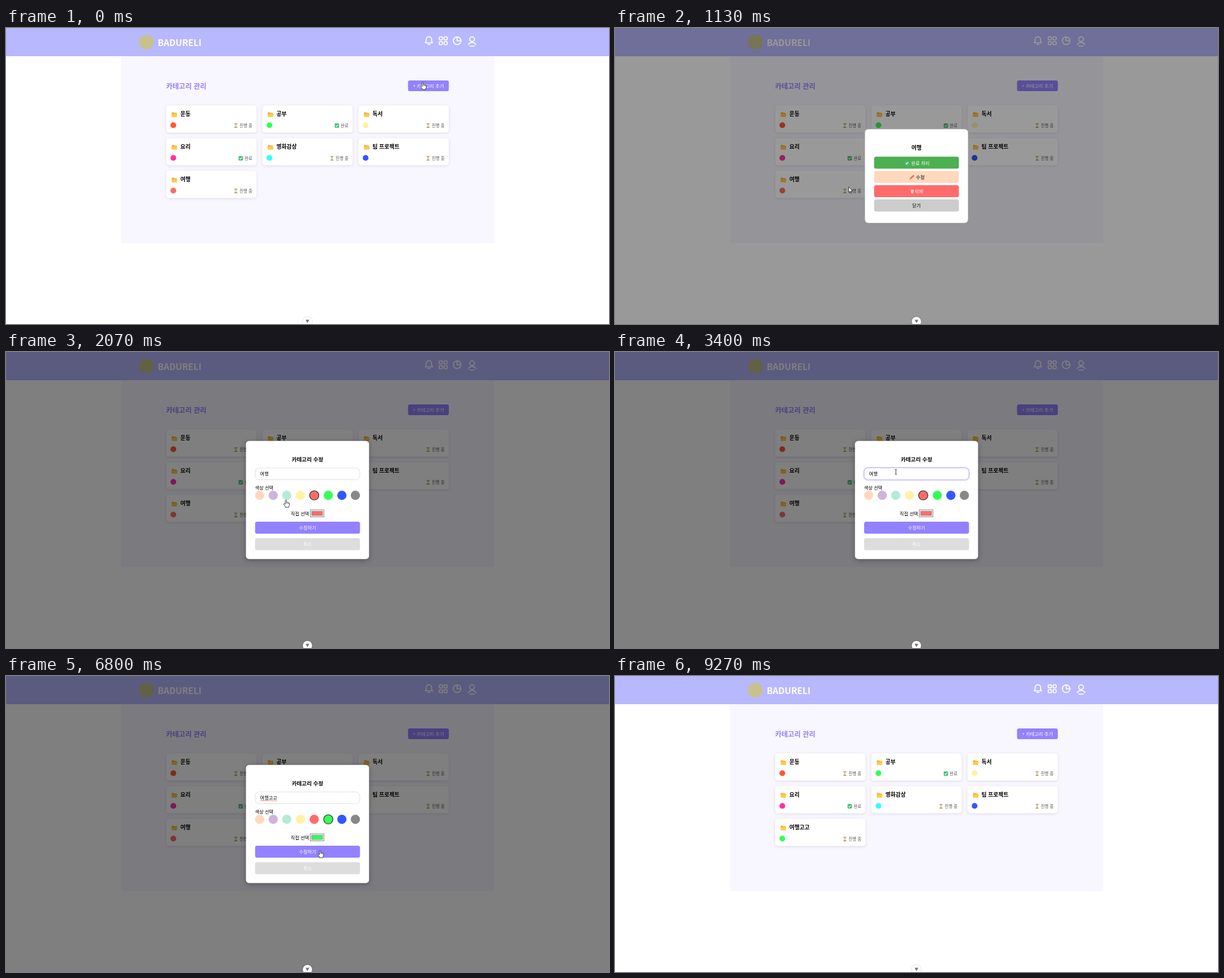
Write an HTML page that moves like this. It is 1067 by 525 pixels and loops after 9870 ms.

```html
<!DOCTYPE html>
<html lang="ko">
<head>
<meta charset="utf-8">
<title>카테고리 관리</title>
<style>
  html, body { margin: 0; width: 100%; height: 100%; overflow: hidden; background: #fff; }
  svg { display: block; position: absolute; left: 0; top: 0; }
  text { font-family: "Noto Sans CJK KR", "Noto Sans KR", "Noto Sans CJK", "Noto Sans CJK JP", sans-serif; white-space: pre; }
  .card { filter: drop-shadow(0 1.5px 2px rgba(0,0,0,.12)); }
  .lift { filter: drop-shadow(0 2px 5px rgba(0,0,0,.3)); }
  .down { filter: drop-shadow(0 .5px 1.5px rgba(0,0,0,.2)); }
</style>
</head>
<body>
<svg id="stage" width="1067" height="525" viewBox="0 0 1067 525"></svg>
<script>
const LOOP = 9870, FRAME = 200 / 3;
const VIOLET = '#9381ff', CORAL = '#ff6b6b', LIME = '#33ff57';

const rect = (x, y, w, h, fill, r = 0, more = '') =>
  `<rect x="${x}" y="${y}" width="${w}" height="${h}" rx="${r}" fill="${fill}" ${more}/>`;
const disc = (x, y, r, fill, more = '') => `<circle cx="${x}" cy="${y}" r="${r}" fill="${fill}" ${more}/>`;
const path = (d, more) => `<path d="${d}" ${more}/>`;
const label = (x, y, s, size, fill = '#000', more = '') =>
  `<text x="${x}" y="${y}" font-size="${size}" fill="${fill}" ${more}>${s}</text>`;
const at = (x, y, inner) => `<g transform="translate(${x} ${y})">${inner}</g>`;
const BOLD = 'font-weight="700"', MID = 'text-anchor="middle"', END = 'text-anchor="end"';

// Small icons, drawn around their own origin
const folder = path('M-4.6 3.6V-3.4q0-.8.8-.8h2.4l1.1 1.2h3.5q.8 0 .8.8v1', 'fill="#f5a623"')
  + path('M-4.6 4.2V-.6L-3 -1.8H4.9q.5 0 .4.6L4.4 3.6q-.2.7-.9.7z', 'fill="#ffca4d"');
const check = rect(-3.8, -3.8, 7.6, 7.6, '#43bf75', 1.2)
  + path('M-2.1 0L-.6 1.7L2.2 -1.8', 'fill="none" stroke="#fff" stroke-width="1.1"');
const glass = path('M-2.2 -3.2H2.2Q2.2 -1 .5 0Q2.2 1 2.2 3.2H-2.2Q-2.2 1 -.5 0Q-2.2 -1 -2.2 -3.2z', 'fill="#cddccf"')
  + path('M-1.5 -1.8H1.5L0 .2zM-1.9 3L0 1.2L1.9 3z', 'fill="#e6b04a"')
  + rect(-2.9, -3.9, 5.8, 1, '#a68352', .4) + rect(-2.9, 2.9, 5.8, 1, '#a68352', .4);
const pencil = path('M-4.2 4L-3.2 1.2L2 -3.8L4 -1.8L-1.4 3.1z', 'fill="#ee6a3c"')
  + path('M-4.2 4L-3.2 1.2L-1.4 3.1z', 'fill="#f3cf9c"')
  + path('M2 -3.8L2.9 -4.4L4.5 -2.7L4 -1.8z', 'fill="#d94f5c"');
const bin = path('M-2.2 -1.8H2.2L1.8 3.2H-1.8zM-2.6 -3H2.6V-2.2H-2.6z', 'fill="#fff"')
  + path('M-.6 -1V2.4M.7 -1V2.4', 'stroke="#ff6b6b" stroke-width=".6"');

const cursors = {
  arrow: path('M0 0V9.8L2.3 7.7L3.8 11.2L5.3 10.5L3.8 7.2H6.8z', 'fill="#fff" stroke="#111" stroke-width=".8"'),
  hand: path('M-1.1 .9Q0 -.7 1.1 .9V4.4Q2.2 3.8 3 4.8Q4 4.3 4.7 5.4Q6 5 6.2 6.5V9Q6.2 10.6 5 12V13.2H-.8V12.2L-3.8 8.2Q-4.4 6.8 -3 6.6L-1.1 8z',
    'fill="#fff" stroke="#111" stroke-width=".8" stroke-linejoin="round"') + path('M1.1 4.4V7M3 5V7.2M4.7 5.6V7.4', 'stroke="#111" stroke-width=".5"'),
  beam: path('M-1.8 -4.4Q0 -4.4 0 -3.6Q0 -4.4 1.8 -4.4M0 -3.6V3.6M-1.8 4.4Q0 4.4 0 3.6Q0 4.4 1.8 4.4', 'fill="none" stroke="#222" stroke-width=".9"')
};

const cards = [
  ['운동', '#ff5733'], ['공부', LIME, 1], ['독서', '#fff1a6'],
  ['요리', '#ff33a1', 1], ['영화감상', '#33fff6'], ['팀 프로젝트', '#3357ff'],
  ['여행', CORAL]
];

function card([name, color, done], i) {
  const last = i === 6;
  return at(283.4 + i % 3 * 170.1, 137.2 + Math.floor(i / 3) * 58,
    rect(0, 0, 160, 48.4, '#fff', 5, 'class="card"')
    + at(14.6, 16.4, folder)
    + label(25, 19.1, name, 9.78, '#000', BOLD + (last ? ' id="name"' : ''))
    + disc(12.7, 35.2, 5.1, color, last ? 'id="dot"' : '')
    + at(done ? 132 : 123.3, 35.9, done ? check : glass)
    + label(152.6, 38.6, done ? '완료' : '진행 중', 7.5, '#555', END));
}

const header = rect(0, 0, 1067, 50, '#b8b8ff')
  + disc(248.3, 25, 13, '#c5c28c')
  + label(268.4, 32, 'BADURELI', 15.56, '#fff', BOLD)
  + `<g fill="none" stroke="#fff" stroke-width="1.8" stroke-linecap="round" stroke-linejoin="round">`
  + path('M741.9 26.3H754.7L753.2 23.6V20.4A4.9 4.9 0 0 0 743.4 20.4V23.6zM746.6 29.2H750')
  + [0, 1, 2, 3].map(i => rect(766.6 + i % 2 * 8.5, 15.6 + (i >> 1) * 8.5, 5.6, 5.6, 'none', 1.6)).join('')
  + disc(798.3, 22.6, 6.8, 'none') + path('M798.3 15.8V22.6H805.1')
  + disc(824.7, 19.8, 4.2, 'none') + path('M817.8 29.6Q820.2 25.6 824.7 25.6T831.6 29.6M820.8 31.7Q824.7 32.9 828.6 31.7')
  + '</g>';

const page = rect(203.6, 50, 660.2, 331.6, '#f8f7ff') + header
  + label(283.2, 107.6, '카테고리 관리', 12.3, VIOLET, BOLD)
  + rect(711.4, 92.9, 72.2, 19.2, VIOLET, 3.4)
  + label(747.5, 105.9, '+ 카테고리 추가', 8.3, '#fff', MID)
  + cards.map(card).join('')
  + rect(434.2, 283.4, .9, 10.4, '#000', 0, 'id="stray"');

const bar = (y, fill) => rect(458.5, y, 150, 21.3, fill, 3.6);
const menu = rect(0, 0, 1067, 525, 'rgba(0,0,0,.4)')
  + rect(442.3, 179.6, 182.3, 166.1, '#fff', 5.6)
  + label(533.5, 216, '여행', 9.78, '#000', MID + BOLD.replace('font', ' font'))
  + bar(228.3, '#4caf50') + at(516.8, 239.6, check) + label(524.2, 242.6, '완료 처리', 8.2, '#fff')
  + bar(253.5, '#ffd8be') + at(525, 265, pencil) + label(532.6, 267.9, '수정', 8.2)
  + bar(278.8, CORAL) + at(526, 290, bin) + label(530.3, 293.1, '삭제', 8.2, '#fff')
  + bar(304.1, '#ccc') + label(533.5, 318.3, '닫기', 8.2, '#000', MID);

const swatches = [[448.8, '#ffd8be'], [472.8, '#cdb4db'], [496.7, '#b5ead7'], [521, '#fff1a6'],
  [545.4, CORAL], [570.3, LIME], [594.3, '#3357ff'], [618.2, '#888']];
const TEXT_X = 449.6, TEXT_SIZE = 8.2, STEP = TEXT_SIZE * .92;
let wave = `M${TEXT_X + .4} 221`;
for (let i = 0; i < 15; i++) wave += `q.5 -1.1 1 0t1 0`;

const edit = rect(0, 0, 1067, 525, 'rgba(0,0,0,.5)')
  + rect(424.6, 157.8, 217.8, 209.4, '#fff', 5.6, 'class="lift"')
  + label(533.5, 193.8, '카테고리 수정', 9.6, '#000', MID + ' ' + BOLD)
  + rect(440.2, 204.9, 186.6, 22.4, 'none', 7.5, 'id="ring" stroke="#dad4ff" stroke-width="2"')
  + rect(441, 205.7, 185, 20.8, '#fff', 6.7, 'id="field" stroke-width=".6"')
  + label(TEXT_X, 219.3, '', TEXT_SIZE, '#000', 'id="typed"')
  + path(wave, 'id="wave" fill="none" stroke="#e8322c" stroke-width=".7"')
  + rect(0, 212, .9, 9, '#000', 0, 'id="caret"')
  + label(440.7, 243.7, '색상 선택', 8.2)
  + swatches.map(([x, c]) => disc(x, 254.3, 8.2, c, 'class="sw" stroke="#333"')).join('')
  + label(503.8, 290, '직접 선택', 8.2)
  + rect(538.3, 279.9, 24.4, 12.7, '#efefef', 0, 'stroke="#767676" stroke-width=".8"')
  + rect(540.9, 282.5, 19.2, 7.5, CORAL, 0, 'id="pick" stroke="#777" stroke-width=".6"')
  + rect(440.8, 301.1, 185.6, 21.2, VIOLET, 3.6) + label(533.5, 315.2, '수정하기', 8.2, '#fff', MID)
  + rect(440.8, 330.3, 185.6, 21.3, '#ddd', 3.6) + label(533.5, 344.4, '취소', 8.2, '#fff', MID);

const $ = id => document.getElementById(id);
$('stage').innerHTML = `<g>${page}</g><g id="menu">${menu}</g><g id="edit">${edit}</g>`
  + disc(533.4, 520.6, 8.2, '#fff', 'class="down"') + path('M530.1 517.6H536.7L533.4 523.4z', 'fill="#777"')
  + '<g id="mouse">' + Object.keys(cursors).map(k => `<g id="${k}">${cursors[k]}</g>`).join('') + '</g>';
const dots = [...document.querySelectorAll('.sw')];

// Pointer track: time, x, y
const track = [
  [0, 737.4, 96], [70, 729, 101], [130, 700, 116], [200, 634, 155], [270, 545, 215], [330, 468, 264],
  [400, 428, 289], [470, 415, 293.5], [530, 413.6, 281.8], [1400, 413.6, 281.8], [1530, 440, 276], [1670, 488, 264],
  [1730, 495.3, 262.2], [2130, 495.3, 262.2], [2400, 495, 240], [2600, 496.5, 217], [2730, 497, 212.8], [5330, 497, 212.8],
  [5470, 506, 219], [5670, 547, 244], [5870, 571.5, 258.6], [6130, 572, 261.4], [6270, 572, 261.4],
  [6400, 567, 282], [6600, 556, 307], [6670, 555.7, 309], [7000, 555.7, 309], [7200, 537, 330], [7400, 526, 340],
  [8400, 526, 340], [8600, 460, 365], [8800, 300, 424], [9000, 125, 493], [9070, 51, 516], [9130, 20, 540], [LOOP, 20, 540]
];
// Typed value over time
const typing = [[0, '여행'], [4130, '여행ㄱ'], [4270, '여행고'], [4400, '여행고ㄱ'], [4530, '여행고고']];

function pointer(t) {
  const i = Math.max(1, track.findIndex(p => p[0] >= t));
  const [t0, x0, y0] = track[i - 1], [t1, x1, y1] = track[i], k = (t - t0) / (t1 - t0);
  return [x0 + (x1 - x0) * k, y0 + (y1 - y0) * k];
}

function cursorKind(x, y, view) {
  const over = (l, t, r, b) => x >= l && x <= r && y >= t && y <= b;
  if (view === 'menu')
    return [0, 1, 2, 3].some(i => over(458, 228.3 + i * 25.2, 609, 249.6 + i * 25.2)) ? 'hand' : 'arrow';
  if (view === 'edit') {
    if (over(440, 204, 627, 228)) return 'beam';
    const hit = swatches.some(([sx]) => Math.hypot(x - sx, y - 254.3) < 8.6);
    return hit || over(441, 301, 627, 322) || over(441, 330, 627, 352) ? 'hand' : 'arrow';
  }
  return over(711, 93, 784, 112) ? 'hand' : 'arrow';
}

const show = (id, on) => $(id).setAttribute('visibility', on ? 'visible' : 'hidden');
const set = (el, name, v) => el.setAttribute(name, v);
const within = (t, ...spans) => spans.some(([a, b]) => t >= a && t < b);

function draw(ms) {
  const t = Math.min(LOOP - 10, Math.round(Math.floor((ms % LOOP + 3.5) / FRAME) * FRAME / 10) * 10);
  const view = within(t, [1130, 2070]) ? 'menu' : within(t, [2070, 6870]) ? 'edit' : 'page';
  const saved = t >= 6870, picked = t >= 6270, focused = within(t, [2870, 6270]);

  $('menu').style.display = view === 'menu' ? '' : 'none';
  $('edit').style.display = view === 'edit' ? '' : 'none';
  $('name').textContent = saved ? '여행고고' : '여행';
  set($('dot'), 'fill', saved ? LIME : CORAL);
  show('stray', within(t, [6870, 7400], [7930, 8470], [9000, 9270]));

  if (view === 'edit') {
    const value = typing.filter(s => t >= s[0]).pop()[1];
    $('typed').textContent = value;
    set($('caret'), 'x', TEXT_X + value.length * STEP - .7);
    show('caret', within(t, [2870, 3400], [3930, 5070], [5600, 6130]));
    show('ring', focused);
    set($('field'), 'stroke', focused ? '#a99bff' : '#ccc');
    show('wave', t >= 5600);
    dots.forEach((d, i) => {
      const on = i === (picked ? 5 : 4);
      set(d, 'stroke-width', on ? 1.2 : 0);
    });
    set($('pick'), 'fill', picked ? LIME : CORAL);
  }

  const [x, y] = pointer(t), kind = cursorKind(x, y, view);
  set($('mouse'), 'transform', `translate(${x} ${y})`);
  for (const k in cursors) show(k, k === kind);
}

let start;
function tick(now) {
  start ??= now;
  draw(now - start);
  requestAnimationFrame(tick);
}
draw(0);
requestAnimationFrame(tick);
</script>
</body>
</html>
```
